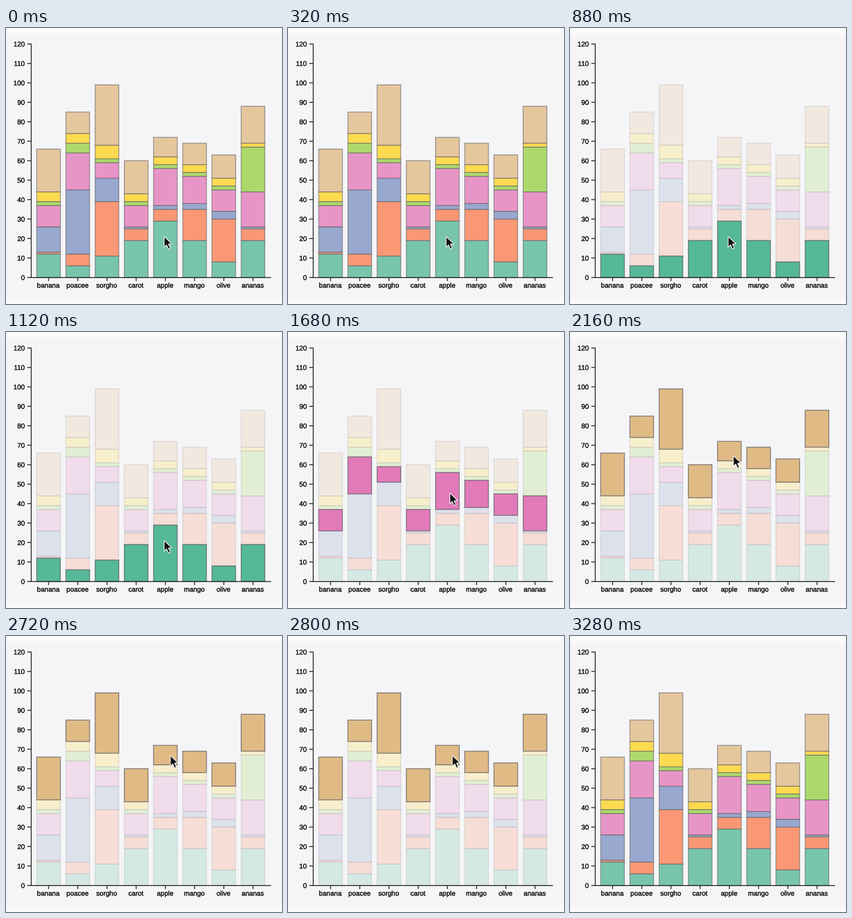
Write a matplotlib script that moves like this. It is 480x480 px and loops after 3760 ms.

```python
import numpy as np
import matplotlib.pyplot as plt
from matplotlib.animation import FuncAnimation
from matplotlib.patches import Polygon, Rectangle
from matplotlib.patheffects import withStroke

SIZE, DPI = 480, 100
STEP, FRAMES = 80, 47
PX = 72 / DPI
PAPER = np.array([245, 245, 247]) / 255
INK = "#222222"

# the chart's data: amounts per fruit, stacked from the bottom
FRUITS = {
    "banana": (12, 1, 13, 11, 2, 5, 22),
    "poacee": (6, 6, 33, 19, 5, 5, 11),
    "sorgho": (11, 28, 12, 8, 2, 7, 31),
    "carot": (19, 6, 1, 11, 2, 4, 17),
    "apple": (29, 6, 2, 19, 2, 4, 10),
    "mango": (19, 16, 3, 14, 2, 4, 11),
    "olive": (8, 22, 4, 11, 2, 4, 12),
    "ananas": (19, 6, 1, 18, 23, 2, 19),
}
OPACITY = {"normal": .78, "faded": .2, "strong": 1}
PALETTE = np.array(plt.get_cmap("Set2").colors[:7]) ** 1.2

HOVER_START, HOVER_END = 880, 3280
STOPS = {0: (275, 362.5), 1600: (281.5, 280), 2160: (284, 215), 2720: (285.7, 207.7)}


def y_of(value):
    return 433.8 - value * 406 / 120


def arrow():
    """Pointer outline: one half mirrored on its axis, then tilted."""
    half = np.array([(7.3, 17.2), (1.8, 15.2), (1.8, 23)])
    pts = np.vstack([(0, 0), half, half[::-1] * (-1, 1)])
    c, s = np.cos(np.radians(23)), np.sin(np.radians(23))
    return pts @ np.array([(c, -s), (s, c)])


ARROW = arrow()

fig = plt.figure(figsize=(SIZE / DPI, SIZE / DPI), dpi=DPI, facecolor="#fafafb")
ax = fig.add_axes([0, 0, 1, 1])
ax.set_xlim(0, SIZE)
ax.set_ylim(SIZE, 0)
ax.axis("off")
ax.add_patch(Rectangle((0, 10), SIZE, 460, color=PAPER, lw=0))


def line(xs, ys):
    ax.plot(xs, ys, color=INK, lw=1.5 * PX, zorder=4, snap=False,
            solid_capstyle="butt")


def label(x, y, text, ha):
    ax.text(x, y, text, ha=ha, va="baseline", family="Liberation Sans",
            size=11.8 * PX, color=INK, zorder=5,
            path_effects=[withStroke(linewidth=.45 * PX, foreground=INK)])


layers = [[] for _ in PALETTE]
for i, (name, values) in enumerate(FRUITS.items()):
    left = 53.4 + 50.8 * i
    tops = np.cumsum(values)
    for layer, top, value in zip(layers, tops, values):
        rect = Rectangle((left, y_of(top)), 41.2, y_of(0) - y_of(value),
                         lw=1.5 * PX, snap=False)
        layer.append(ax.add_patch(rect))
    center = left + 20.6
    line([center, center], [434, 440])
    label(center - .5, 451.5, name, "center")

for value in range(0, 121, 10):
    y = y_of(value)
    line([37, 44], [y, y])
    label(32.8, y + 4.3, str(value), "right")
line([43.8, 43.8], [27.3, 434.5])
line([43.2, 461], [434, 434])

pointer = ax.add_patch(Polygon(ARROW, closed=True, fc="#111111", ec="#f4f4f4",
                               lw=1.3 * PX, zorder=6))


def layer_at(y):
    """Layer of the apple bar that lies under the pointer."""
    return int(np.searchsorted(-y_of(np.cumsum(FRUITS["apple"])), -y))


def paint(k, style):
    alpha = OPACITY[style]
    for rect in layers[k]:
        rect.set(facecolor=alpha * PALETTE[k] + (1 - alpha) * PAPER,
                 edgecolor=(.36, .36, .38, .75 * alpha),
                 zorder=3 if style == "strong" else 2)


def draw(frame):
    now = frame * STEP
    tip = STOPS[max(t for t in STOPS if t <= now)]
    hovering = HOVER_START <= now < HOVER_END
    active = layer_at(tip[1])
    for k in range(len(layers)):
        if not hovering:
            paint(k, "normal")
        else:
            paint(k, "strong" if k == active else "faded")
    pointer.set_xy(ARROW + tip)
    pointer.set_visible(now < HOVER_END)
    return []


anim = FuncAnimation(fig, draw, frames=FRAMES, interval=STEP, repeat=True,
                     repeat_delay=0, blit=False)
plt.show()
```
